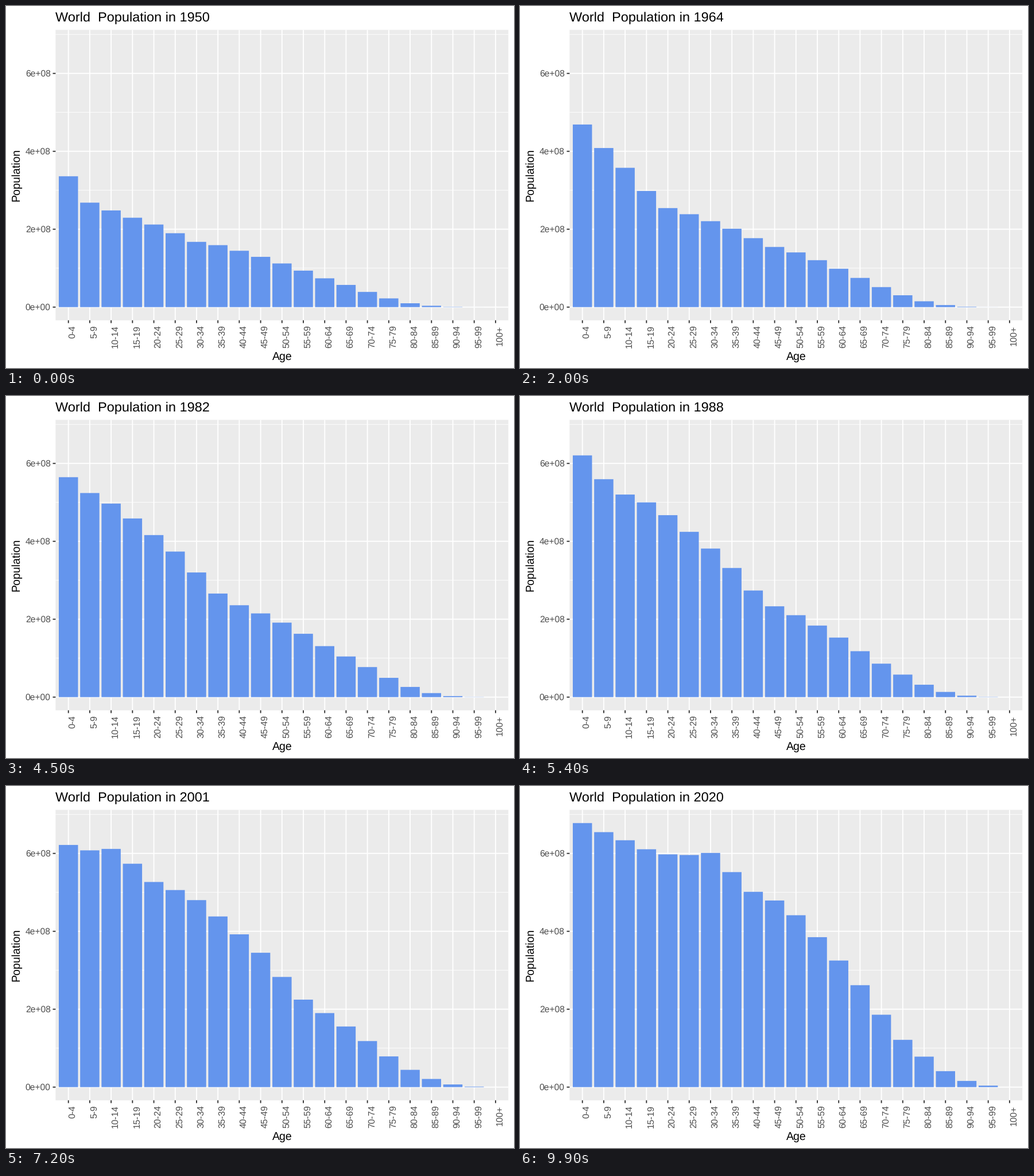
A matplotlib script that plays this animation: 885x632 px, repeating every 10000 ms.

```python
import numpy as np
import matplotlib.pyplot as plt
from matplotlib.animation import FuncAnimation
from matplotlib.patches import Rectangle

plt.rcParams["font.family"] = "Liberation Sans"
plt.rcParams["text.hinting"] = "no_hinting"

W, H, DPI = 885, 632, 128
FRAMES, INTERVAL = 100, 100
FIRST, SPAN = 1950, 70

# Panel geometry in pixels
LEFT, RIGHT, TOP, BOTTOM = 86.4, 875.2, 41.7, 548.7
ZERO, PER_MILLION = 525.7, 0.68
PITCH = (RIGHT - LEFT) / 21.2
TICK = 4.9

# Age groups are five years wide; the last one, 100+, stays empty
AGES = np.arange(20)
LABELS = [f"{5 * a}-{5 * a + 4}" for a in AGES] + ["100+"]
CENTERS = LEFT + PITCH * (np.arange(21) + 0.6)

# Turning points of the youngest group's size, in millions
COHORTS = {1860: 215, 1870: 155, 1890: 156, 1915: 202, 1920: 205, 1930: 246,
           1940: 275, 1945: 287, 1950: 337, 1955: 397, 1970: 517, 1975: 540,
           1980: 550, 1990: 638, 1997: 621, 2003: 624, 2012: 659, 2020: 679}


def population(t):
    """Size of every age group: its cohort at birth, thinned by mortality."""
    born = t - 5 * AGES
    size = np.interp(born, list(COHORTS), list(COHORTS.values()))
    child = 0.09 * np.exp((1950 - born) / 50) * (1 - np.exp(-AGES))
    ageing = 0.0042 * np.exp((1925 - born) / 100 + 0.36 * AGES)
    return size * np.exp(-child - ageing)


fig = plt.figure(figsize=(W / DPI, H / DPI), dpi=DPI, facecolor="white")
ax = fig.add_axes([0, 0, 1, 1])
ax.set(xlim=(0, W), ylim=(H, 0))
ax.axis("off")


def line(xs, ys, color="white", width=1.067):
    ax.plot(xs, ys, color=color, lw=width, solid_capstyle="butt",
            snap=False, zorder=1)


def label(x, y, s, size, color="black", ha="center", angle=0):
    return ax.text(x, y, s, fontsize=size, color=color, ha=ha, va="baseline",
                   rotation=angle, rotation_mode="anchor")


def box(x, y, w, h, color, z):
    return ax.add_patch(Rectangle((x, y), w, h, fc=color, lw=0,
                                  snap=False, zorder=z))


box(LEFT, TOP, RIGHT - LEFT, BOTTOM - TOP, "#EBEBEB", 0)

for v in range(0, 800, 100):
    y = ZERO - v * PER_MILLION
    major = v % 200 == 0
    line([LEFT, RIGHT], [y, y], width=1.067 if major else 0.533)
    if major:
        line([LEFT - TICK, LEFT], [y, y], "#333333")
        label(77.6, y + 5.6, f"{v // 100}e+{'08' if v else '00'}", 8.8,
              "#4D4D4D", "right")

for x, s in zip(CENTERS, LABELS):
    line([x, x], [TOP, BOTTOM])
    line([x, x], [BOTTOM, BOTTOM + TICK], "#333333")
    label(x + 12, BOTTOM + 8.8, s, 8.8, "#4D4D4D", "right", 90)

label((LEFT + RIGHT) / 2, 617.6, "Age", 11)
label(22.8, (TOP + BOTTOM) / 2, "Population", 11, angle=90)
title = label(LEFT, 27, "", 13.2, ha="left")

bars = [box(CENTERS[a] - 0.45 * PITCH, ZERO, 0.9 * PITCH, 0,
            "cornflowerblue", 3) for a in AGES]


def update(i):
    t = FIRST + SPAN * i / (FRAMES - 1)
    title.set_text(f"World  Population in {round(t)}")
    for bar, v in zip(bars, population(t)):
        bar.set_height(-v * PER_MILLION)
    return [title, *bars]


anim = FuncAnimation(fig, update, frames=FRAMES, interval=INTERVAL,
                     repeat=True, repeat_delay=0)
plt.show()
```
